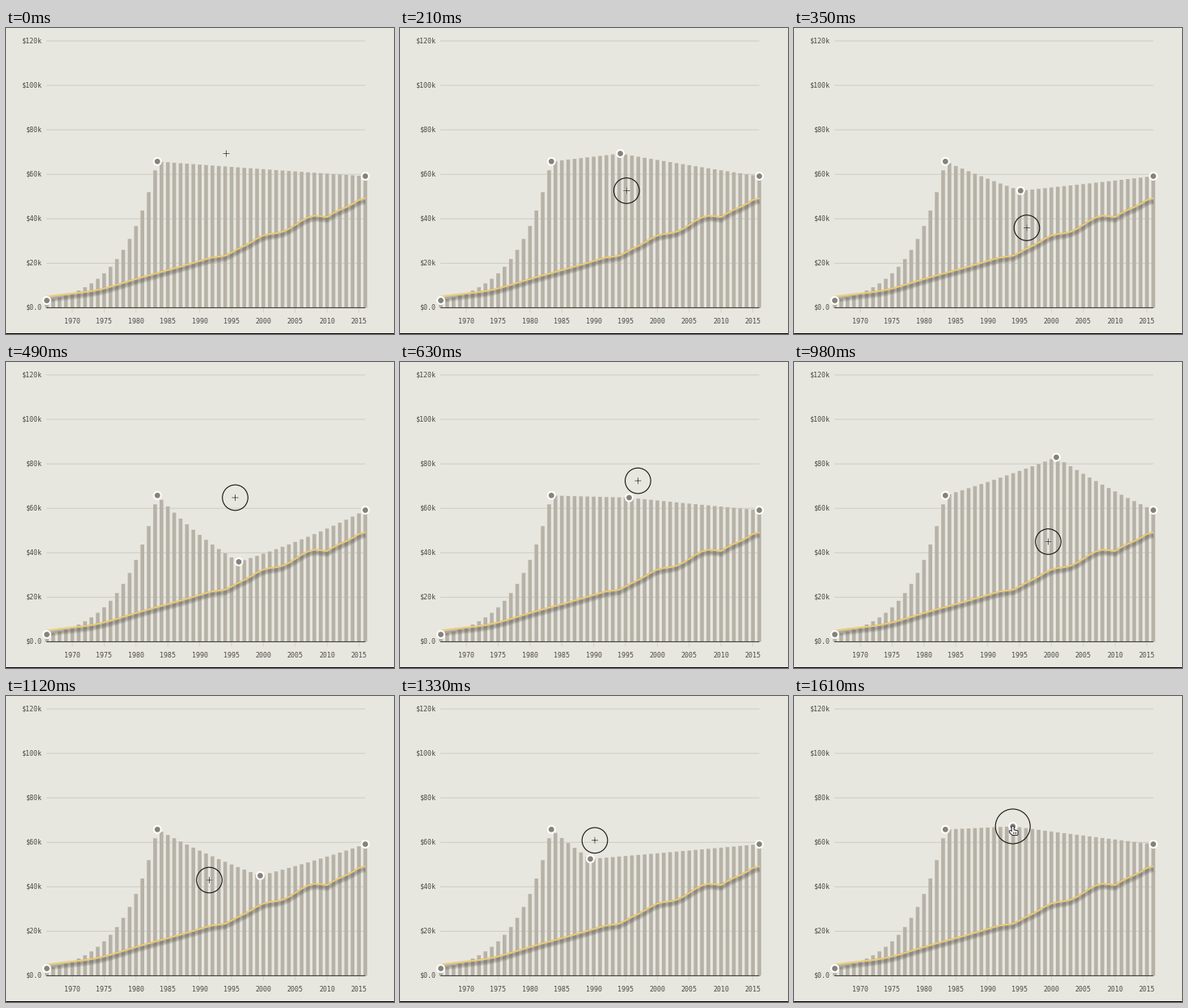
Animation of 480 by 379 pixels, one loop 1680 ms. Source, as a matplotlib script:

```python
import numpy as np
import matplotlib.pyplot as plt
from matplotlib.animation import FuncAnimation
from matplotlib.patches import Circle, Rectangle

W, H, DPI = 480, 379, 100
FRAMES, INTERVAL = 24, 70
PX = 72 / DPI  # points per pixel

LEFT, RIGHT, BASE = 50.5, 444.5, 347.0
YEARS = np.arange(1966, 2017)
BAR_X = np.linspace(LEFT, RIGHT, len(YEARS))
K_STEP = 2.754  # pixels per $1k

PAPER, BAR, GRID, INK = "#e8e7df", "#b7b2a7", "#d0cfc7", "#4a4945"
YELLOW, DOT = "#efcc72", "#85827b"

START, PEAK, END = (50.5, 338), (187.3, 165.8), (444.5, 184)

# Where the pointer turns or changes pace: frame, x, y
TURNS = np.array([
    (1, 272.6, 156), (5, 288, 248), (7, 283.5, 168.5), (10, 303, 139),
    (12, 324.5, 118.5), (14, 314.5, 223), (16, 251.5, 228.5),
    (17, 235.5, 202.3), (19, 241, 179.3), (21, 270.7, 162),
])
RELEASE = TURNS[-1, 0]


def glide(t, ts, vs):
    """Smooth interpolation that rests at both ends and never overshoots."""
    t = np.clip(t, ts[0], ts[-1])
    h = np.diff(ts)
    d = np.diff(vs) / h
    a, b = d[:-1], d[1:]
    slope = np.zeros(len(ts))
    same = a * b > 0
    slope[1:-1][same] = 2 * (a * b)[same] / (a + b)[same]
    i = min(np.searchsorted(ts, t, side="right"), len(h)) - 1
    u = (t - ts[i]) / h[i]
    ease = u * u * (3 - 2 * u)
    bend = h[i] * u * (1 - u) * (slope[i] * (1 - u) - slope[i + 1] * u)
    return vs[i] * (1 - ease) + vs[i + 1] * ease + bend


def pointer(t):
    frames, xs, ys = TURNS.T
    return glide(t, frames, xs), glide(t, frames, ys)


def bar_heights(knots):
    """Constant growth rate between neighbouring handles."""
    xs, ys = np.array(knots).T
    return np.exp(np.interp(BAR_X, xs, np.log(BASE - ys)))


def income():
    """Quadratic trend in $1k with a few booms and slumps."""
    t = YEARS - YEARS[0]
    value = 5.08 + 0.469 * t + 0.0082 * t ** 2
    for size, centre, width in ((-1.3, 8, 5), (-1.2, 28, 1.4), (2, 34, 2.2),
                                (2.55, 41, 2.6), (-1.45, 43.9, 1), (0.75, 49, 0.9)):
        value += size * np.exp(-((t - centre) / width) ** 2)
    return BASE - value * K_STEP


fig = plt.figure(figsize=(W / DPI, H / DPI), dpi=DPI, facecolor="black")
ax = fig.add_axes([0, 0, 1, 1])
ax.set_xlim(0, W)
ax.set_ylim(H + 0.5, 0.5)
ax.axis("off")


def stroke(xs, ys, color, width, z, cap="butt", **kw):
    return ax.plot(xs, ys, color=color, lw=width * PX, zorder=z, snap=False,
                   solid_capstyle=cap, solid_joinstyle="round", **kw)[0]


def label(x, y, text, ha):
    ax.text(x, y, text, ha=ha, va="baseline", color=INK, fontsize=8.35 * PX,
            family="DejaVu Sans Mono", zorder=3)


def handle(x, y):
    rim = Circle((x, y), 5.5, fc="white", ec="none", zorder=8)
    core = Circle((x, y), 3.4, fc=DOT, ec="none", zorder=9)
    for patch in (rim, core):
        ax.add_patch(patch)
    return rim, core


def hand_cursor(x, y):
    """Pointing hand: round strokes in ink, then again in white."""
    limbs = [((0, 0), (1, 8), 2), ((-3, 0), (6.5, 9.5), 2)]
    limbs += [((k, k), (5.5 + k / 5, 9.5), 2.2) for k in (1.5, 3.2, 4.8)]
    parts = []
    for color, extra, z in (("#222222", 2, 13), ("white", 0, 14)):
        for (x0, x1), (y0, y1), width in limbs:
            parts.append(stroke([x + x0, x + x1], [y + y0, y + y1], color,
                                width + extra, z, cap="round"))
    for k in (0.8, 2.5, 4.2):
        parts.append(stroke([x + k, x + k], [y + 7, y + 9.5], "#222222", 0.7, 15))
    return parts


ax.add_patch(Rectangle((0, 0), W, 378.5, fc=PAPER, ec="none", zorder=0))

for k in range(0, 121, 20):
    y = BASE - k * K_STEP
    if k:
        stroke([50, RIGHT], [y, y], GRID, 1.1, 1)
    label(44, y + 2.2, f"${k}k" if k else "$0.0", "right")

for x, year in zip(BAR_X, YEARS):
    if year % 5 == 0:
        stroke([x, x], [BASE, BASE + 6], GRID, 0.8, 1)
        label(x, 366, str(year), "center")

bars = [ax.add_patch(Rectangle((x - 2.3, BASE), 4.6, 0, fc=BAR, ec="none",
                               zorder=2, snap=False)) for x in BAR_X]
stroke([50, RIGHT], [BASE, BASE], "#45443f", 1.2, 4)

line_y = income()
for width in np.linspace(2, 9, 7):  # soft shadow
    stroke(BAR_X, line_y + 3.3, "#55524a", width, 5, alpha=0.075)
stroke(BAR_X, line_y, YELLOW, 1.9, 6)

for spot in (START, PEAK, END):
    handle(*spot)
moving = handle(0, 0)

ring = Circle((0, 0), 15.8, fc="none", ec="#111111", lw=1.1 * PX, zorder=10)
ax.add_patch(ring)
cross = [stroke([], [], "white", 2.4, 11, alpha=0.4),
         stroke([], [], "#333333", 0.8, 12)]
hand = hand_cursor(*pointer(FRAMES))


def draw(i):
    x, y = pointer(i)
    dragging, released = i > 0, i > RELEASE

    knots = [START, PEAK, END]
    if dragging:
        spot = pointer(i - 2)  # the handle trails the pointer
        knots.insert(2, spot)
        for patch in moving:
            patch.center = spot
    for bar, h in zip(bars, bar_heights(knots)):
        bar.set_y(BASE - h)
        bar.set_height(h)

    ring.center = (x, y)
    ring.set_radius(15.8 + 2.85 * max(0, i - RELEASE))
    for line in cross:
        line.set_data([x - 4, x + 4, np.nan, x, x], [y, y, np.nan, y - 4, y + 4])

    for parts, shown in (((*moving, ring), dragging), (cross, not released),
                         (hand, released)):
        for part in parts:
            part.set_visible(shown)
    return []


anim = FuncAnimation(fig, draw, frames=FRAMES, interval=INTERVAL, repeat=True,
                     repeat_delay=0, blit=False)
plt.show()
```
